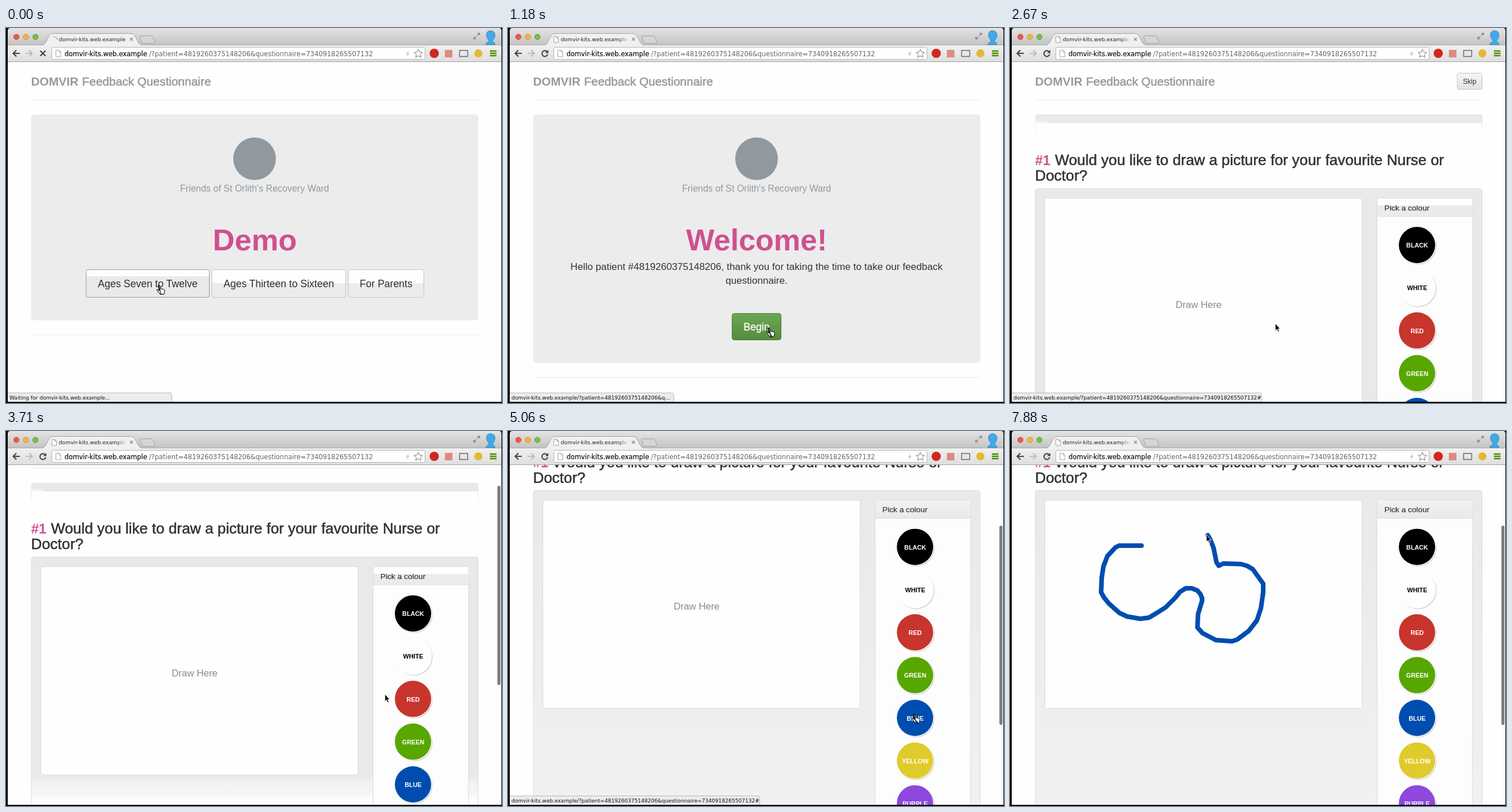
Animation of 860x651 px, one loop 8 s. Source, as an HTML page:

```html
<!DOCTYPE html>
<html lang="en">
<head>
<meta charset="utf-8">
<title>Feedback Questionnaire</title>
<style>
  html, body { margin: 0; width: 100%; height: 100%; overflow: hidden; background: #000; }
  svg { display: block; width: 100vw; height: 100vh; }
  text { font-family: "Liberation Sans", Arial, sans-serif; white-space: pre; }
  .ui { font-family: "DejaVu Sans", sans-serif; }
  .mid { text-anchor: middle; }
  .bold { font-weight: bold; }
  .medium { stroke: currentColor; stroke-width: .55px; fill: currentColor; }
  .pink { fill: #d0508f; }
  .rule { stroke: #ebebeb; }
  .status { font-size: 9.05px; }
  .lead { font-size: 17.1px; fill: #333; }
  .btn { font-size: 17.5px; fill: #2e2e2e; }
  .label { font-size: 10.8px; font-weight: bold; text-anchor: middle; }
</style>
</head>
<body>
<svg viewBox="0 0 860 651" preserveAspectRatio="none">
  <defs>
    <linearGradient id="title" x2="0" y2="1"><stop stop-color="#e4e4e4"/><stop offset="1" stop-color="#c3c3c3"/></linearGradient>
    <linearGradient id="bar" x2="0" y2="1"><stop stop-color="#f1f1f1"/><stop offset="1" stop-color="#dedede"/></linearGradient>
    <linearGradient id="fade" gradientUnits="userSpaceOnUse" x1="192" x2="209"><stop stop-color="#222"/><stop offset="1" stop-color="#222" stop-opacity="0"/></linearGradient>
    <linearGradient id="green" x2="0" y2="1"><stop stop-color="#6ba853"/><stop offset="1" stop-color="#568c40"/></linearGradient>
    <linearGradient id="grey" x2="0" y2="1"><stop stop-color="#f6f6f6"/><stop offset="1" stop-color="#e3e3e3"/></linearGradient>
    <linearGradient id="split" x2="0" y2="1"><stop offset=".5" stop-color="#fefefe"/><stop offset=".5" stop-color="#ececec"/></linearGradient>
    <linearGradient id="hover" x2="0" y2="1"><stop offset=".24" stop-color="#fefefe"/><stop offset=".24" stop-color="#eaeaea"/></linearGradient>
    <linearGradient id="headStep" x2="0" y2="1"><stop offset=".4" stop-color="#fefefe"/><stop offset=".4" stop-color="#ebebeb"/></linearGradient>
    <linearGradient id="headSoft" x2="0" y2="1"><stop stop-color="#f2f2f2"/><stop offset="1" stop-color="#e9e9e9"/></linearGradient>
    <linearGradient id="wellStep" gradientUnits="userSpaceOnUse" x1="0" x2="0" y1="656" y2="697">
      <stop stop-color="#e9e9e9"/><stop offset=".33" stop-color="#efefef"/><stop offset=".34" stop-color="#f2f2f2"/>
      <stop offset=".95" stop-color="#f7f7f7"/><stop offset=".96" stop-color="#fcfcfc"/>
    </linearGradient>
    <linearGradient id="wellSoft" gradientUnits="userSpaceOnUse" x1="0" x2="0" y1="279" y2="824"><stop stop-color="#e9e9e9"/><stop offset="1" stop-color="#f1f1f1"/></linearGradient>
    <clipPath id="view"><rect x="3" y="59" width="856" height="590"/></clipPath>
  </defs>

  <rect width="860" height="651" fill="#000"/>
  <rect x="3" y="59" width="856" height="590" fill="#fefefe"/>

  <g clip-path="url(#view)">
    <g id="page">
      <text y="100" font-size="20.5" fill="#999" color="#999"><tspan x="43.5" class="bold">DOMVIR</tspan><tspan x="132" class="medium">Feedback Questionnaire</tspan></text>
      <path class="rule" d="M44 124.5H819"/>
      <path id="blankRule" class="rule" d="M44 150.5H819"/>

      <g id="card">
        <rect id="cardBox" x="43.5" y="150" width="775.5" rx="6" fill="#ececec"/>
        <circle cx="431" cy="227" r="37" fill="#8f999f"/>
        <text class="mid" x="431" y="284" font-size="16" fill="#8f999f">Friends of St Orlith's Recovery Ward</text>
        <path id="cardRule" class="rule" d="M44 .5H819"/>
      </g>

      <g id="demo">
        <text class="mid bold pink" x="431.5" y="386" font-size="52.5">Demo</text>
        <g id="choices"></g>
      </g>

      <g id="welcome">
        <text class="mid bold pink" x="431" y="386" font-size="52">Welcome!</text>
        <text class="mid lead" x="431" y="420">Hello patient #4819260375148206, thank you for taking the time to take our feedback</text>
        <text class="mid lead" x="431" y="444">questionnaire.</text>
        <rect id="begin" x="388.5" y="495.5" width="85" height="46" rx="4" fill="url(#green)" stroke="#4c7f39"/>
        <text class="mid" x="431" y="525" font-size="17.6" fill="#fff" stroke="#fff" stroke-width=".3">Begin</text>
      </g>

      <g id="skip">
        <rect x="775.5" y="78.5" width="43" height="28" rx="3" fill="url(#grey)" stroke="#c2c2c2"/>
        <text class="mid" x="797" y="96.5" font-size="12" fill="#333">Skip</text>
      </g>

      <g id="question">
        <path d="M43.5 165V153q0-3 3-3H816q3 0 3 3V165Z" fill="#e9e9e9"/>
        <path d="M44 165V181M818.500 165V181" stroke="#ececec"/>
        <text class="bold" x="44" y="171" font-size="15" fill="#fefefe">0%</text>
        <text y="238" font-size="25.900" color="#333"><tspan x="43.5" class="bold pink" font-size="24">#1</tspan><tspan x="78" class="medium">Would you like to draw a picture for your favourite Nurse or</tspan><tspan x="43.5" y="265" class="medium">Doctor?</tspan></text>
        <rect id="well" x="44" y="279" width="774.5" height="620" rx="4" stroke="#dadada"/>
        <rect x="60.5" y="295.5" width="550" height="361.5" rx="3" fill="#fefefe" stroke="#dadada"/>
        <text id="hint" class="mid" x="327" y="485.500" font-size="16.7" fill="#8a8a8a">Draw Here</text>
        <rect x="636.5" y="295.5" width="165.500" height="600" rx="3" fill="#fdfdfd" stroke="#dadada"/>
        <rect id="head" x="637" y="296" width="164.500" height="31" rx="2"/>
        <path d="M637 327H802" stroke="#dcdcdc"/>
        <text class="medium" x="649" y="316.500" font-size="13.700" color="#333" style="stroke-width:.2px">Pick a colour</text>
        <g id="swatches"></g>
      </g>
    </g>
    <polyline id="ink" fill="none" stroke="#004db0" stroke-width="8" stroke-linecap="round" stroke-linejoin="round"/>
    <rect id="thumb" x="852" width="5.500" height="346" rx="2.700" fill="#808080"/>
    <g id="status">
      <path id="statusBox" fill="#ececec" stroke="#b9b9b9"/>
      <text id="statusText" class="ui status" x="6" y="644.500" fill="#111"></text>
    </g>
  </g>

  <!-- window chrome -->
  <path d="M3 30V5q0-5 5-5H855q4 0 4 5V30Z" fill="url(#title)"/>
  <rect x="3" y="29" width="856" height="30" fill="url(#bar)"/>
  <path d="M3 29.500H859" stroke="#a6a6a6"/>
  <path d="M3 58.500H859" stroke="#a0a0a0"/>
  <g stroke-width=".8">
    <circle cx="18" cy="15.500" r="4.700" fill="#f0564e" stroke="#b8423c"/>
    <circle cx="34.500" cy="15.500" r="4.700" fill="#f5b43c" stroke="#bd8528"/>
    <circle cx="51" cy="15.500" r="4.700" fill="#72c04c" stroke="#4e9132"/>
  </g>
  <path d="M62 30C72 30 71 10 81 9.500H217C227 10 226 30 237 30Z" fill="#f0f0f0"/>
  <path d="M62 29.500C72 29.500 71 10 81 9.500H217C227 10 226 29.500 237 29.500" fill="none" stroke="#a2a2a2"/>
  <path d="M233 13.500H251q3 0 4 3l3 7q1 3-2 3H239q-3 0-4-3l-3-7q-1-3 1-3Z" fill="#d5d5d5" stroke="#a4a4a4"/>
  <path id="spin" d="M82 15q6 0 7 6" fill="none" stroke="#b0b0b0" stroke-width="1.500"/>
  <path id="tabDoc" d="M79.500 14.500h5l3 3v7.500h-8Zm5 0v3h3" fill="#fff" stroke="#999" stroke-width=".9"/>
  <text id="tabText" class="ui" x="91.500" y="23" font-size="9.200">domvir-kits.web.example</text>
  <path d="M215 17l5 5m0-5l-5 5" stroke="#888" stroke-width="1.300"/>
  <path d="M817 13l4-4m-3.500 0h3.500v3.500M815 15l-4 4m3.500 0h-3.500v-3.500" fill="none" stroke="#777" stroke-width="1.200"/>
  <path d="M832 29q0-4 5-5v-3q-4-4-4-9 0-7 7-7.500 8 .5 8 8 0 5-4 9v2.500q4 1 4 5Z" fill="#41a9ea" stroke="#2b83bd" stroke-width=".8"/>

  <path d="M24 44H13m5-5.500L12.500 44l5.500 5.500" fill="none" stroke="#444" stroke-width="2.200"/>
  <path d="M34 44H45m-5-5.500l5.500 5.500-5.500 5.500" fill="none" stroke="#bdbdbd" stroke-width="2.200"/>
  <path id="stop" d="M59.500 39.500l9 9m0-9l-9 9" stroke="#444" stroke-width="2.300"/>
  <g id="reload"><path d="M68 41.500A5 5 0 1 0 68.800 45.500" fill="none" stroke="#444" stroke-width="2.100"/><path d="M70 38v5.500h-5.500Z" fill="#444"/></g>
  <rect x="79.500" y="33.500" width="647" height="21" rx="2" fill="#fff" stroke="#b4b4b4"/>
  <path d="M86.500 38.500h5.500l3 3v8.500h-8.500Zm5.500 0v3h3" fill="#fff" stroke="#999" stroke-width=".9"/>
  <text class="ui" y="48.500" font-size="11.400"><tspan x="101.500" fill="#111" stroke="#111" stroke-width=".2">domvir-kits.web.example</tspan><tspan x="248" fill="#666">/?patient=4819260375148206&amp;questionnaire=7340918265507132</tspan></text>
  <path id="bolt" d="M699 39l-6 6h3l-2 5 6-6.500h-3Z" fill="#c9c9c9"/>
  <path d="M715 37l2.200 4.800 5.200.6-3.900 3.500 1.100 5.100-4.600-2.600-4.600 2.600 1.100-5.100-3.900-3.500 5.200-.6Z" fill="#fff" stroke="#777"/>
  <circle cx="742.500" cy="44" r="8" fill="#d0271f"/>
  <rect x="761" y="38" width="13" height="13" fill="#dd8b80"/>
  <rect x="786.500" y="39" width="14" height="10.500" fill="none" stroke="#6a6a6a" stroke-width="1.500"/>
  <circle cx="819" cy="44" r="7" fill="#e3b934"/>
  <path d="M839 40H850.500M839 44H850.500M839 48H850.500" stroke="#4c9100" stroke-width="2.300"/>

  <path id="hand" d="M0 1q1.500-2 3 0l1 5 2-.5 2 1 2 .2 1.200 2-.6 4-1 2.500H4.500L1-.5l-1 0ZM0 1L2 9l-2.500-2q-2-.5-2 1l4 5 2 2.500H9" fill="#fff" stroke="#111" stroke-width="1.100" stroke-linejoin="round"/>
  <path id="arrow" d="M0 0V12.500l2.800-2.600 2 4.600 2-.9-2-4.400H8.500Z" fill="#000" stroke="#fff" stroke-width=".9"/>
</svg>

<script>
const $ = id => document.getElementById(id);
const show = (id, on) => { $(id).style.display = on ? "" : "none"; };
const set = (id, attrs) => { for (const k in attrs) $(id).setAttribute(k, attrs[k]); };

const LOOP = 8000, TICK = 148.7;
const HOST = "domvir-kits.web.example";
const QUERY = "/?patient=4819260375148206&";
const STATUS = {
  wait: ["Waiting for " + HOST + "...", 288],
  short: [HOST + QUERY + "q...", 288],
  long: [HOST + QUERY + "questionnaire=7340918265507132#", 437]
};

const buttons = [["Ages Seven to Twelve", 139, 352.5], ["Ages Thirteen to Sixteen", 357, 589], ["For Parents", 593.5, 724.5]];
$("choices").innerHTML = buttons.map(([label, a, b], i) =>
  `<rect x="${a}" y="419.500" width="${b - a}" height="48" rx="3" fill="url(#${i ? "split" : "hover"})" stroke="${i ? "#c4c4c4" : "#999"}"/>
   <text class="mid btn" x="${(a + b) / 2}" y="450">${label}</text>`).join("");

const colours = { BLACK: "#000", WHITE: "#fefefe", RED: "#c7352d", GREEN: "#58a700", BLUE: "#004db0", YELLOW: "#e0cb2c", PURPLE: "#8e48dd" };
$("swatches").innerHTML = Object.entries(colours).map(([name, fill], i) => {
  const y = 376.7 + i * 74.2;
  return `<circle cx="707.200" cy="${y + 1.5}" r="32.300" fill="#cacaca"/>
    <circle cx="706.200" cy="${y + .5}" r="32.300" fill="#fefefe"/>
    <circle cx="705.700" cy="${y}" r="31.500" fill="${fill}"/>
    <text class="label" x="706" y="${y + 4.5}" fill="${name === "WHITE" ? "#000" : "#fff"}">${name}</text>`;
}).join("");

// pen stroke, and how many of its points exist at each tick
const stroke = [
  [228,199],[189,199],[183,202],[169,217],[162,235],[159,255],[158,280],[163,289],[171,299],[182,309],[190,316],
  [203,322],[226,326],[241,324],[256,315],[270,306],[287,289],[295,279],[305,273],[315,273],[325,277],[330,283],
  [333,290],[333,295],[326,318],[325,341],[334,351],[357,363],[385,365],[394,362],[414,347],[428,329],[435,308],
  [439,280],[439,265],[421,240],[411,234],[400,231],[370,230],[362,234],[358,228],[353,203],[347,188],[343,181]
];
const FIRST = 37;
const drawn = [1, 2, 6, 10, 16, 23, 23, 25, 27, 29, 31, 34, 36, 39, 42, 43, 44];

// pointer path: tick, x, y
const moves = [[0,264,447],[3,264,447],[8,451,521],[15,451,521],[16,460,513],[18,460,513],[22,657,457],[28,657,457],[31,703,492],[34,703,492],[37,226,198]];
const scrolls = [0, 60, 125, 165, 175.5];

function pointer(n) {
  const i = moves.findIndex(m => m[0] > n) - 1;
  const [a, ax, ay] = moves[i], [b, bx, by] = moves[i + 1];
  let k = (n - a) / (b - a);
  k = k * k * (3 - 2 * k);
  return [ax + (bx - ax) * k, ay + (by - ay) * k];
}

function statusAt(n) {
  if (n < 3) return STATUS.wait;
  if (n >= 7 && n < 17 || n === 31 || n === 32) return STATUS.short;
  if (n >= 17 && n < 20 || n >= 33 && n < 36) return STATUS.long;
  return null;
}

function render(n) {
  const loading = n === 0, blank = n === 1 || n === 2, asking = n >= 16;
  const scroll = scrolls[Math.max(0, Math.min(4, n - 24))];
  const soft = n >= 28;

  show("spin", loading); show("stop", loading);
  show("tabDoc", !loading); show("reload", !loading);
  set("tabText", { fill: loading ? "#222" : "url(#fade)" });
  show("bolt", !blank);

  show("blankRule", blank);
  show("card", !blank && !asking);
  show("demo", loading);
  show("welcome", n >= 3 && !asking);
  show("skip", n >= 13);
  show("question", asking);
  set("cardBox", { height: loading ? 357.5 : 431.5 });
  set("cardRule", { transform: `translate(0 ${loading ? 532 : 606})` });
  set("begin", { fill: n === 12 || n === 13 ? "#4f8339" : "url(#green)" });

  set("page", { transform: `translate(0 ${-scroll})` });
  set("well", { fill: soft ? "url(#wellSoft)" : "url(#wellStep)" });
  set("head", { fill: soft ? "url(#headSoft)" : "url(#headStep)" });
  show("hint", n < FIRST);
  show("thumb", n >= 25);
  set("thumb", { y: 59 + scroll * .6 });

  const status = statusAt(n);
  show("status", status);
  if (status) {
    $("statusText").textContent = status[0];
    set("statusBox", { d: `M2 633.500H${status[1] - 3.5}q3 0 3 3V650H2Z` });
  }

  const pen = n >= FIRST;
  const line = pen ? stroke.slice(0, drawn[n - FIRST]) : [];
  set("ink", { points: line.join(" ") });
  const tip = line[line.length - 1];
  const [x, y] = pen ? [tip[0] - 2.5, tip[1] - 1] : pointer(n);
  const hand = n < 3 || n >= 7 && n < 16 || n >= 31 && n < 35;
  show("hand", hand); show("arrow", !hand);
  set(hand ? "hand" : "arrow", { transform: `translate(${x} ${y})` });
}

let last = -1;
function frame() {
  const t = performance.now() % LOOP;
  const n = Math.min(53, Math.floor((t + 10) / TICK));
  if (n !== last) render(last = n);
  requestAnimationFrame(frame);
}
frame();
</script>
</body>
</html>
```
